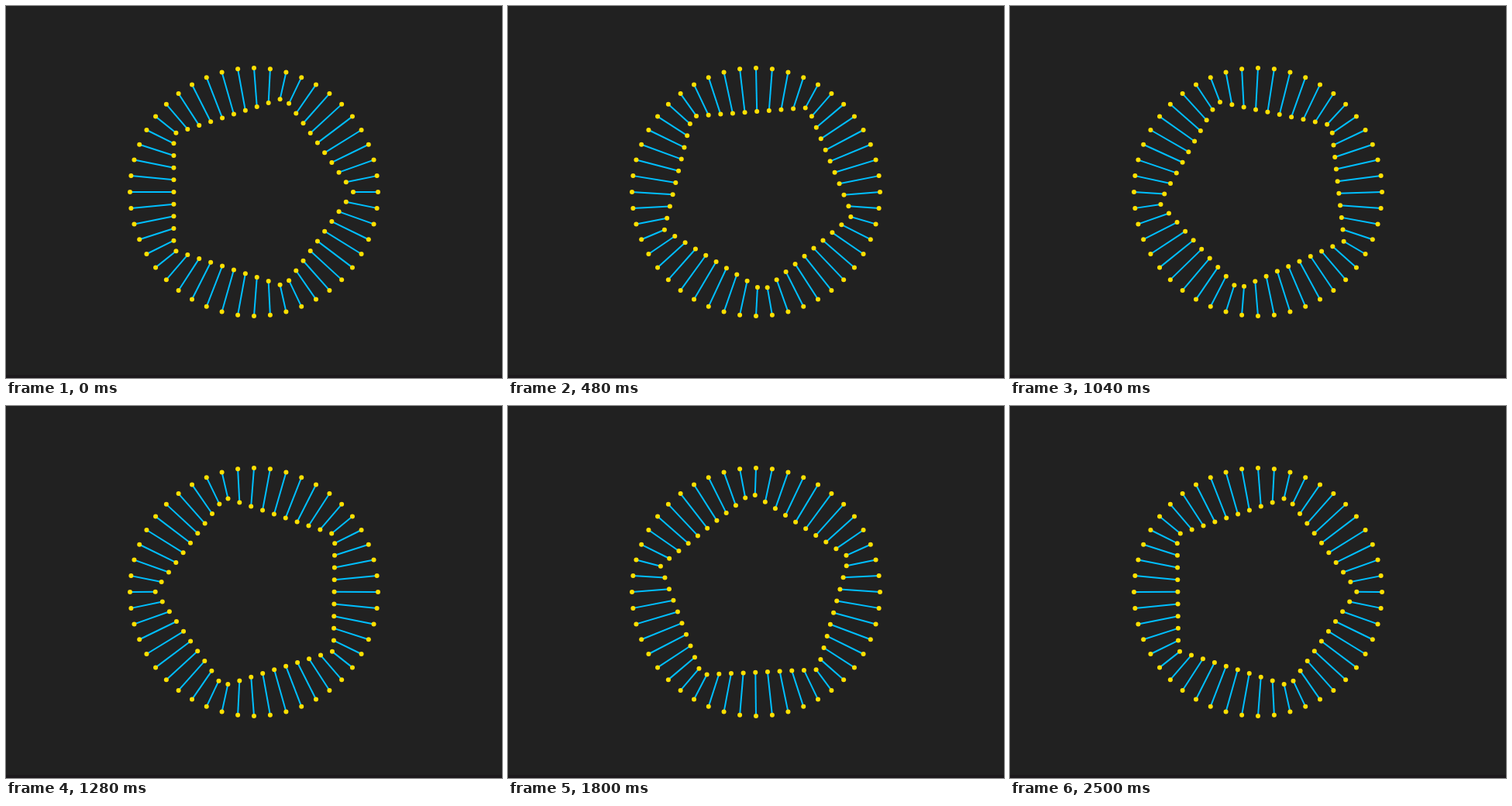
An HTML page with a canvas that plays this animation: 640 by 480 pixels, repeating every 2520 ms.

```html
<!DOCTYPE html>
<html lang="en">
<head>
<meta charset="utf-8">
<title>Rolling pentagon</title>
<style>
  html, body { margin: 0; width: 100%; height: 100%; overflow: hidden; background: #212121; }
  canvas { display: block; }
</style>
</head>
<body>
<canvas id="stage" width="640" height="480"></canvas>
<script>
const ctx = document.getElementById('stage').getContext('2d');
const LOOP = 2520, STEP = 20, COUNT = 48, SIDES = 5;
const OUTER = 160, INNER = 128, TURN = 2 * Math.PI;

// Angles run counterclockwise from the right.
const polar = (radius, angle) => [320 + radius * Math.cos(angle), 240 - radius * Math.sin(angle)];

// Point at a fraction of the pentagon's perimeter, measured from its first corner.
function onPentagon(fraction, rotation) {
  const along = fraction * SIDES, side = Math.floor(along), k = along - side;
  const [ax, ay] = polar(INNER, side * TURN / SIDES + rotation);
  const [bx, by] = polar(INNER, (side + 1) * TURN / SIDES + rotation);
  return [ax + (bx - ax) * k, ay + (by - ay) * k];
}

function dot([x, y]) {
  ctx.beginPath();
  ctx.arc(x, y, 3, 0, TURN);
  ctx.fill();
}

function draw(time) {
  // The pentagon turns clockwise by one side per loop while its points slide back.
  const shift = Math.floor(time % LOOP / STEP) * STEP / LOOP / SIDES;

  ctx.fillStyle = '#212121';
  ctx.fillRect(0, 0, 640, 480);
  ctx.fillStyle = '#1c191c';
  ctx.fillRect(0, 476, 640, 4);

  ctx.strokeStyle = '#00bfff';
  ctx.fillStyle = '#ffe000';
  ctx.lineWidth = 2;
  for (let i = 0; i < COUNT; i++) {
    const outer = polar(OUTER, i / COUNT * TURN);
    const inner = onPentagon(i / COUNT + shift, -shift * TURN);
    ctx.beginPath();
    ctx.moveTo(...outer);
    ctx.lineTo(...inner);
    ctx.stroke();
    dot(outer);
    dot(inner);
  }
}

const start = performance.now();
function frame() {
  draw(performance.now() - start);
  requestAnimationFrame(frame);
}
frame();
</script>
</body>
</html>
```
